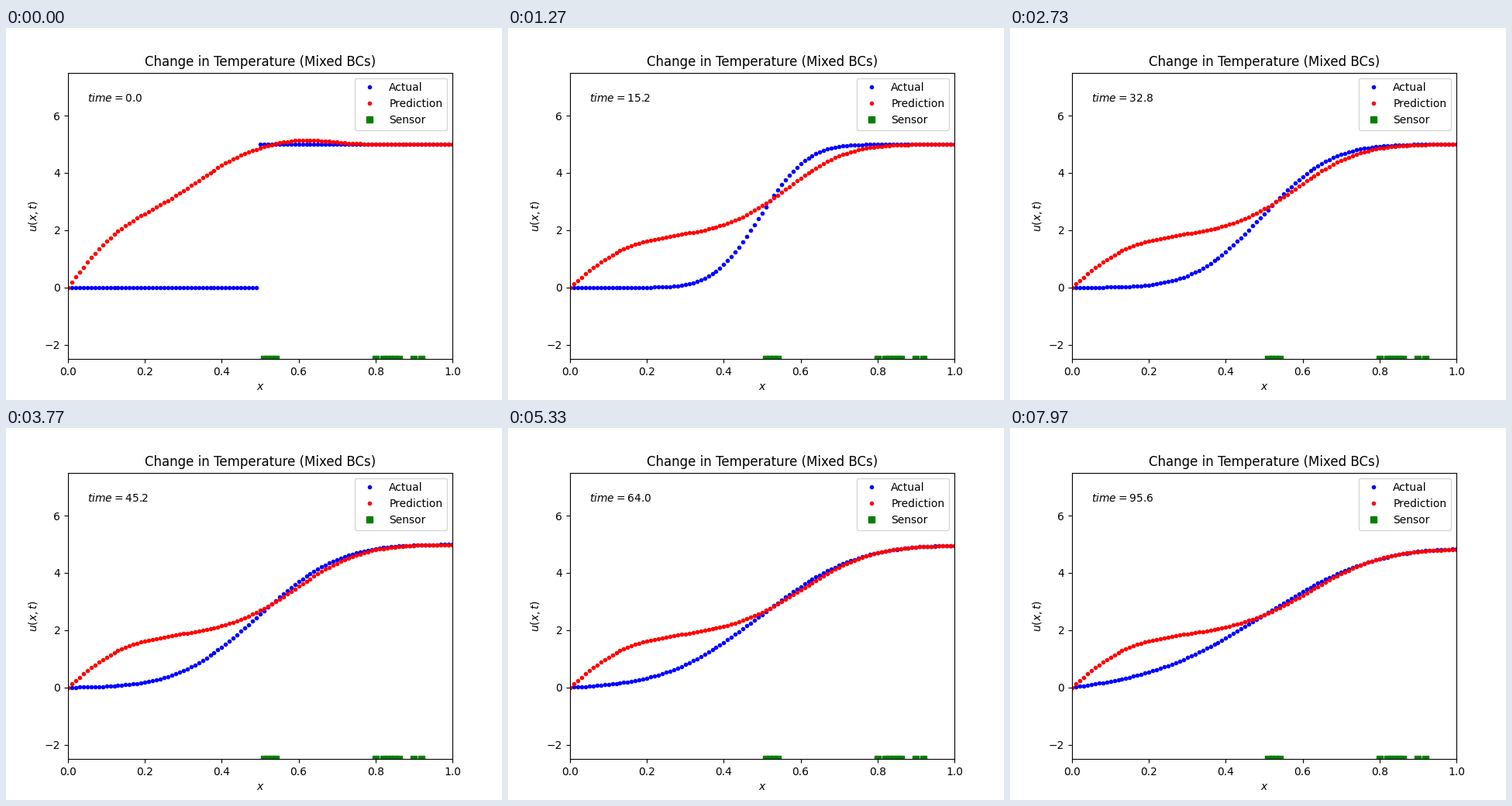
Recreate the animation shown at these times as a matplotlib script. Size 640 by 480 pixels, loop 8 s.

```python
import math

import matplotlib.pyplot as plt
import numpy as np
from matplotlib.animation import FuncAnimation

LOOP_MS = 8000
TICK_MS = 20          # redraw interval
STEPS = 240           # simulation steps in one loop
DT = 0.4
ALPHA = 3e-4          # diffusivity of the rod
HOT = 5.0
EDGE = 0.495          # where the initial step sits

x = np.linspace(0, 1, 101)
sensors = np.array([.51, .52, .53, .54, .80, .82, .83, .84, .85, .86, .90, .92])
phi = np.vectorize(lambda z: 0.5 * (1 + math.erf(z / math.sqrt(2))))


def spread(t):
    return max(math.sqrt(2 * ALPHA * t), 1e-6)


def heat(pos, t):
    """Diffusing step: fixed zero on the left, insulated on the right."""
    s = spread(t)
    return HOT * (phi((pos - EDGE) / s) - phi((pos - 2 + EDGE) / s)
                  - phi(-(pos + EDGE) / s))


def estimate(t):
    """Shoulder on the left that climbs to the value at the right end."""
    s = spread(t)
    fresh = math.exp(-t / 2)              # initial misfit, soon gone
    shoulder = (1 + 0.5 * fresh) * (1.8 * np.tanh(x / 0.15) + 1.2 * x ** 2)
    centre = 0.5335 + 0.465 * s - 0.17 * fresh
    climb = phi((x - centre) / (0.105 + 0.175 * s))
    overshoot = 0.16 * fresh * np.exp(-((x - 0.61) / 0.07) ** 2 / 2)
    return shoulder + (heat(1.0, t) - shoulder) * climb + overshoot


fig, ax = plt.subplots(figsize=(6.4, 4.8), dpi=100)
ax.set(xlim=(0, 1), ylim=(-2.5, 7.5), xlabel="$x$", ylabel="$u(x,t)$",
       title="Change in Temperature (Mixed BCs)")
actual, = ax.plot(x, heat(x, 0), "b.", label="Actual")
prediction, = ax.plot(x, estimate(0), "r.", label="Prediction")
ax.plot(sensors, np.full(len(sensors), -2.5), "gs", label="Sensor")
ax.legend(loc="upper right")
clock = ax.text(0.05, 0.9, "$time=0.0$", transform=ax.transAxes)


def update(tick):
    step = round(tick * TICK_MS * STEPS / LOOP_MS)
    t = step * DT
    actual.set_ydata(heat(x, t))
    prediction.set_ydata(estimate(t))
    clock.set_text(f"$time={t:.1f}$")
    return actual, prediction, clock


anim = FuncAnimation(fig, update, frames=LOOP_MS // TICK_MS, interval=TICK_MS,
                     repeat=True, repeat_delay=0)
plt.show()
```
